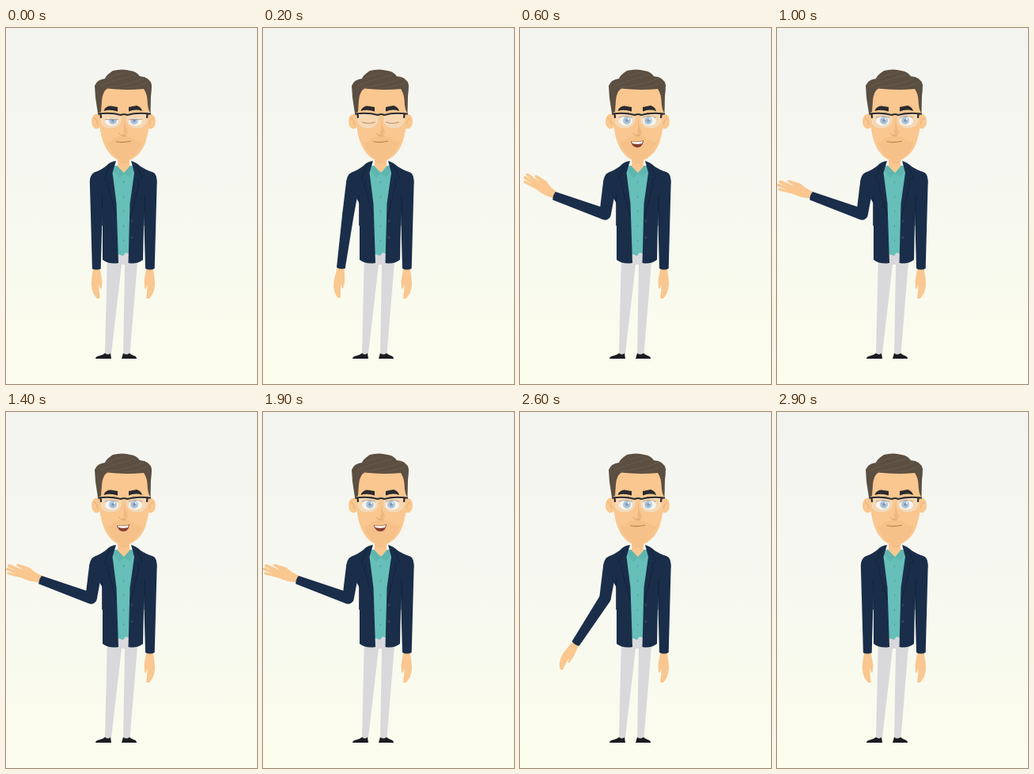
An HTML page that plays this animation: 317x450 px, repeating every 3000 ms.

```html
<!DOCTYPE html>
<html lang="en">
<head>
<meta charset="utf-8">
<title>Presenter</title>
<style>
  html, body { margin: 0; width: 100%; height: 100%; overflow: hidden; }
  svg { display: block; width: 100vw; height: 100vh; }
  .skin { fill: #f9c78f; }
  .shade { fill: #f0b87f; }
  .navy { fill: #1a2e4a; }
  .dark { fill: #2b2b2f; }
  .seam { fill: none; stroke: #10213a; stroke-width: .8; }
  .line { fill: none; stroke-linecap: round; stroke-linejoin: round; }
</style>
</head>
<body>
<svg viewBox="0 0 317 450">
  <defs>
    <linearGradient id="sky" x2="0" y2="1">
      <stop stop-color="#f3f4f0"/>
      <stop offset=".5" stop-color="#f7f8f0"/>
      <stop offset="1" stop-color="#fcfdec"/>
    </linearGradient>
    <path id="sleeve" class="navy" d="M-7.300 0A7.300 7.300 0 0 1 7.300 0L5.400 68.500Q0 70.500-5.400 68.500Z"/>
    <path id="relaxed" class="skin" d="M-4 67H4Q6 76 7 84L6.500 93Q5 95 4 91L3 88Q3 97 4.500 105Q2 108-1 104Q-6 98-6.500 88Q-6.500 80-4 67Z"/>
    <clipPath id="lids"><rect id="opening" x="118" width="62" y="108" height="19"/></clipPath>
  </defs>
  <rect width="317" height="450" fill="url(#sky)"/>

  <!-- legs -->
  <path fill="#d9d9dc" d="M128 284H167L156.500 412H148L150 299H146L133 412H125Z"/>
  <path fill="#1b1c20" d="M125 411Q129 414 132 411L133 418H113Q113 415 119 414Q123 413 125 411ZM148 411Q152 414 156 411Q158 413 161 414Q165 415 165 418H146Z"/>

  <!-- right arm -->
  <use href="#relaxed" transform="translate(181.500 236) scale(-1 1)"/>
  <path class="navy" d="M174 186Q182 178 188 184Q191 188 190.500 200L187.700 304Q182 307 176 304L174 230Z"/>

  <!-- left arm -->
  <g id="upper">
    <path class="navy" d="M-8.500 4Q-8-7 2-9L9 0L7.300 46H-7.300Z"/>
    <g id="fore">
      <use id="closedHand" href="#relaxed"/>
      <g id="openHand" class="skin">
        <path d="M2-5Q-6-8-12-14L-24-18Q-28-19-27-16L-19-11L-35-18Q-39-18-37-15L-27-10L-37-14Q-41-14-39-11L-28-7L-37-9Q-40-8-37-6L-21-2Q-11 3 0 3Z"/>
      </g>
      <use href="#sleeve"/>
    </g>
  </g>

  <!-- torso -->
  <path fill="#66bfb8" d="M132 174H166L160 240L158 286L151 284L148 288L139 285L136 230Z"/>
  <path fill="#57aca6" d="M141 174L149 184L143 189L135 179ZM157 174L149 184L156 188L163 178Z" opacity=".5"/>
  <path class="skin" d="M141 155H156V175L149 183L141 175Z"/>
  <path class="shade" opacity=".6" d="M141 160H156V168Q149 175 141 168Z"/>
  <path class="line" stroke="#489b98" stroke-dasharray="1.500 17" d="M148.500 194V283"/>
  <path class="navy" d="M139 168Q131 169 127 174Q121 179 112 182.500Q106 185 106 195L122 222V293Q130 299 142 297L139.500 222L134.500 183ZM158 168Q165 170 170 175Q176 179 184 182Q191 185 190.500 196L174.500 222L173 293Q165 299 154.500 297L156.500 222L162 183Z"/>
  <path class="seam" d="M131 174L124 191L130 194L128 198L139 237M165 174L172 189L166 193L168 197L157 240M121.500 211V250M175 211V250"/>
  <g fill="#33465f"><circle cx="159" cy="244" r="1.400"/><circle cx="159" cy="265" r="1.400"/></g>

  <!-- head -->
  <g class="skin">
    <ellipse cx="114.500" cy="118" rx="6.500" ry="9.500"/>
    <ellipse cx="182.500" cy="118" rx="6.500" ry="9.500"/>
  </g>
  <path class="line" stroke="#e8ab72" d="M111 114Q115 115 116 122M186 114Q182 115 181 122"/>
  <path class="skin" d="M118 74H181C183 108 182 128 176 145C171 160 158 168.500 149 168.500C140 168.500 129 160 124 147C117 130 117 110 118 74Z"/>
  <path class="shade" opacity=".45" d="M127 144Q134 144 137 139Q148 134 160 139Q164 145 173 144Q165 164 149 168Q134 165 127 144Z"/>
  <path fill="#5b4f42" d="M116 108L113 88L112 73Q115 65 125 64Q126 60 135 54Q147 51 157 54Q165 55 169 61Q182 62 184 72Q184 78 183 86L182.500 108Q179 104 178.500 91Q178 83 174 77Q150 79 128 76.500Q122 80 121 92L120 106Z"/>
  <path class="line" stroke="#6d5f50" stroke-width=".8" d="M119 73Q140 65 163 59M126 75Q151 73 174 64M151 76Q170 74 181 68M126 65Q138 58 151 57"/>

  <g clip-path="url(#lids)">
    <g fill="#f4f5f3"><ellipse cx="133.500" cy="117.500" rx="8.500" ry="6"/><ellipse cx="163.500" cy="117.500" rx="8.500" ry="6"/></g>
    <g fill="#7fa9d3"><circle cx="135" cy="117" r="4.900"/><circle cx="162" cy="117" r="4.900"/></g>
    <g fill="#49617f"><circle cx="135" cy="117" r="1.900"/><circle cx="162" cy="117" r="1.900"/></g>
    <g fill="#fff"><circle cx="137" cy="115" r="1"/><circle cx="164" cy="115" r="1"/></g>
  </g>
  <path id="lashes" class="line" stroke="#8b6a4b" stroke-width="1.100"/>
  <path fill="#f7f3ea" fill-opacity=".36" stroke="#e6e2d6" d="M120 109H145V117Q143 126 132 126Q121 126 120 117ZM153 109H178V117Q176 126 165 126Q154 126 153 117Z"/>
  <path class="line" stroke="#2b2b2f" stroke-width="2.200" d="M117 108.500Q133 106.500 145 110Q149 108 153 110Q165 106.500 182 108.500M119.500 109L120 113M178.500 109L178 113"/>
  <path class="dark" d="M123.500 105Q125 99 132 98.500L141 100V105.500Q131 102.500 123.500 105ZM155 100L165 98Q171 100 172 105Q164 102 155 105.500Z"/>
  <path class="shade" d="M149 113Q151 126 154 132Q152 137 146 136Q150 133 149 113Z"/>
  <path class="line" stroke="#dc9f68" d="M143 133Q146 138 152 136"/>

  <path id="lips" class="line" stroke="#bd8049" stroke-width="1.200" d="M139.500 143.500Q148 145.500 157.500 143"/>
  <path id="mouth" fill="#843f32"/>
  <path id="teeth" fill="#fff"/>
</svg>
<script>
const LOOP = 3000, STEP = 100, RAISED = 110;
// Mouth opening for each step, from closed (0) to wide (3)
const SPEECH = "000001231102312013123121100000";
// Share of the eye left open during the opening blink
const BLINK = [0.55, 0.15, 0, 0.6];

const el = id => document.getElementById(id);
const set = (id, name, value) => el(id).setAttribute(name, value);
const show = (id, on) => set(id, "visibility", on ? "visible" : "hidden");
const clamp = x => Math.max(0, Math.min(1, x));
const smooth = (a, b, t) => {
  const s = clamp((t - a) / (b - a));
  return s * s * (3 - 2 * s);
};

function poseArm(t) {
  const bend = RAISED * (smooth(125, 590, t) - smooth(2390, 2720, t));
  const swing = 8.5 * clamp(bend / 7);
  const flick = 14 * (1 - smooth(600, 1000, t));
  set("upper", "transform", `translate(114.300 190) rotate(${swing})`);
  set("fore", "transform", `translate(0 46) rotate(${bend - swing})`);
  set("openHand", "transform", `translate(0 69) rotate(${flick - RAISED}) scale(1.08)`);
  show("openHand", bend > 50);
  show("closedHand", bend <= 50);
}

function poseEyes(open) {
  const lid = 119 - 8 * open;
  set("opening", "y", lid);
  set("opening", "height", open ? 127 - lid : 0);
  const lash = x => `M${x - 8} ${lid + 2 * open}Q${x} ${lid + 3 - 4 * open} ${x + 8} ${lid + 2 * open}`;
  set("lashes", "d", lash(133.5) + lash(163.5));
}

function poseMouth(open) {
  const drop = 143 + 3 * open, half = 7 + open / 2;
  const left = 148 - half, right = 148 + half;
  set("mouth", "d", `M${left} 143Q148 145 ${right} 142Q${right - 1} ${drop + 2} 148 ${drop + 2}Q${left + 1} ${drop + 1} ${left} 143Z`);
  set("teeth", "d", `M${left + 1} 143.500Q148 145 ${right - 1} 143L${right - 2} 146Q148 147.500 ${left + 2} 146Z`);
  show("lips", !open);
  show("mouth", open);
  show("teeth", open > 1);
}

function draw() {
  const step = Math.floor(performance.now() % LOOP / STEP);
  poseArm(step * STEP);
  poseEyes(BLINK[step] ?? 1);
  poseMouth(+SPEECH[step]);
  requestAnimationFrame(draw);
}
draw();
</script>
</body>
</html>
```
